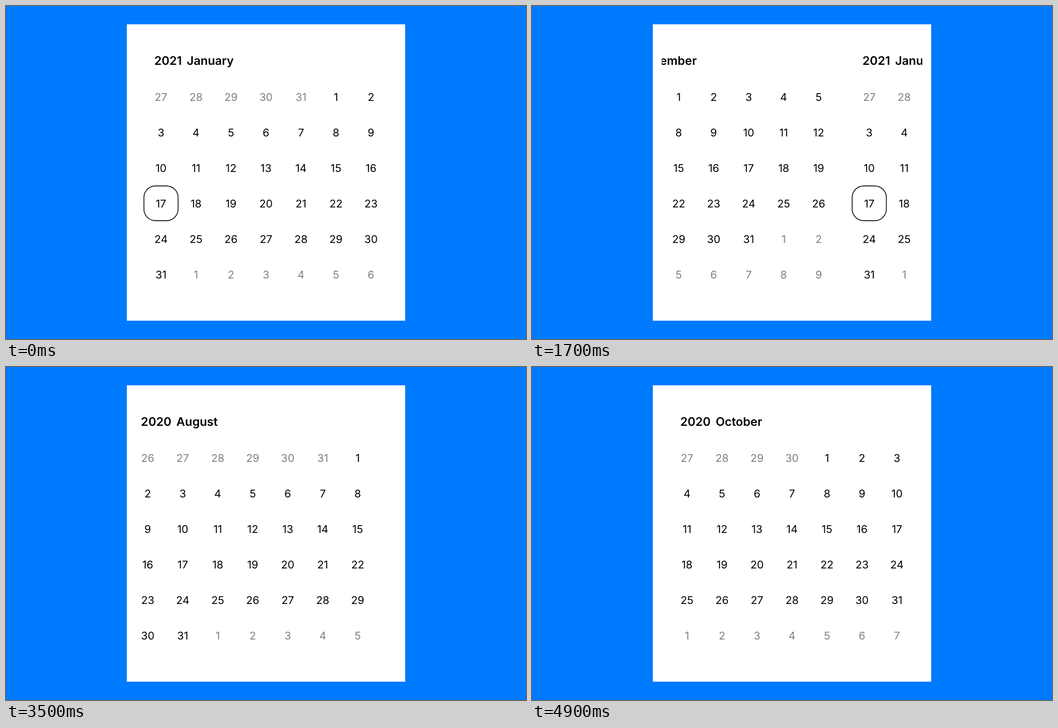
An HTML page for the animation above (5.95 s loop, 934x600 px).

```html
<!DOCTYPE html>
<html lang="en">
<head>
<meta charset="utf-8">
<title>Month carousel</title>
<style>
  html, body { margin: 0; height: 100%; overflow: hidden; background: #007aff; }
  svg { display: block; width: 934px; height: 600px; }
  text { font: 400 19.3px Inter, sans-serif; text-anchor: middle; text-rendering: geometricPrecision; }
  .head { font-size: 21.33px; font-weight: 600; text-anchor: start; }
  .dim { fill: #808080; }
</style>
</head>
<body>
<svg viewBox="0 0 934 600">
  <clipPath id="view"><rect x="233" y="33" width="468" height="534"/></clipPath>
  <rect x="217" y="33" width="500" height="534" fill="#fff"/>
  <g clip-path="url(#view)"><g id="strip"></g></g>
</svg>
<script>
const LOOP = 5950, STEP = 50, PAGE = 468;
const LEFT = 247, CELL_W = 440 / 7, CELL_H = 64;
const strip = document.getElementById('strip');

function add(parent, tag, attrs, content = '') {
  const el = document.createElementNS('http://www.w3.org/2000/svg', tag);
  for (const key in attrs) el.setAttribute(key, attrs[key]);
  el.textContent = content;
  return parent.appendChild(el);
}

// Month 0 is January 2021; negative months lie to its left.
function addMonth(m) {
  const page = add(strip, 'g', { transform: `translate(${m * PAGE} 0)` });
  const first = new Date(2021, m, 1);
  const head = add(page, 'text', { class: 'head', x: 266.2, y: 105.8 }, first.getFullYear());
  add(head, 'tspan', { dx: 9 }, first.toLocaleString('en', { month: 'long' }));

  for (let i = 0; i < 42; i++) {
    const day = new Date(2021, m, 1 + i - first.getDay());
    const x = LEFT + CELL_W * (i % 7), y = 171 + CELL_H * Math.floor(i / 7);
    const inside = day.getMonth() === first.getMonth();
    add(page, 'text', { x: x + CELL_W / 2, y, class: inside ? '' : 'dim' }, day.getDate());
    if (m === 0 && inside && day.getDate() === 17) {
      add(page, 'rect', {
        x: x + 0.7, y: y - 38.8, width: CELL_W - 1.4, height: CELL_H - 1.4, rx: 21,
        fill: 'none', stroke: '#000', 'stroke-width': 1.4
      });
    }
  }
}
for (let m = -7; m <= 2; m++) addMonth(m);

// Swipes: start ms, end ms, month reached
const swipes = [
  [100, 650, 1], [879, 1259, 0], [1350, 1900, -1], [2072, 2400, -2],
  [2550, 2850, -3], [2950, 3244, -4], [3260, 3538, -5], [3570, 3880, -6],
  [3930, 4230, -5], [4309, 4599, -4], [4600, 4782, -2.964], [4800, 4900, -3]
];

function position(t) {
  let pos = 0;
  for (const [start, end, to] of swipes) {
    if (t <= start) break;
    const u = Math.min(1, (t - start) / (end - start));
    pos += (to - pos) * u * u * (3 - 2 * u);
  }
  return pos;
}

const origin = performance.now();
function draw() {
  const t = (performance.now() - origin) % LOOP;
  const x = -PAGE * position(Math.floor(t / STEP) * STEP);
  strip.setAttribute('transform', `translate(${x.toFixed(2)} 0)`);
  requestAnimationFrame(draw);
}
draw();
</script>
</body>
</html>
```
